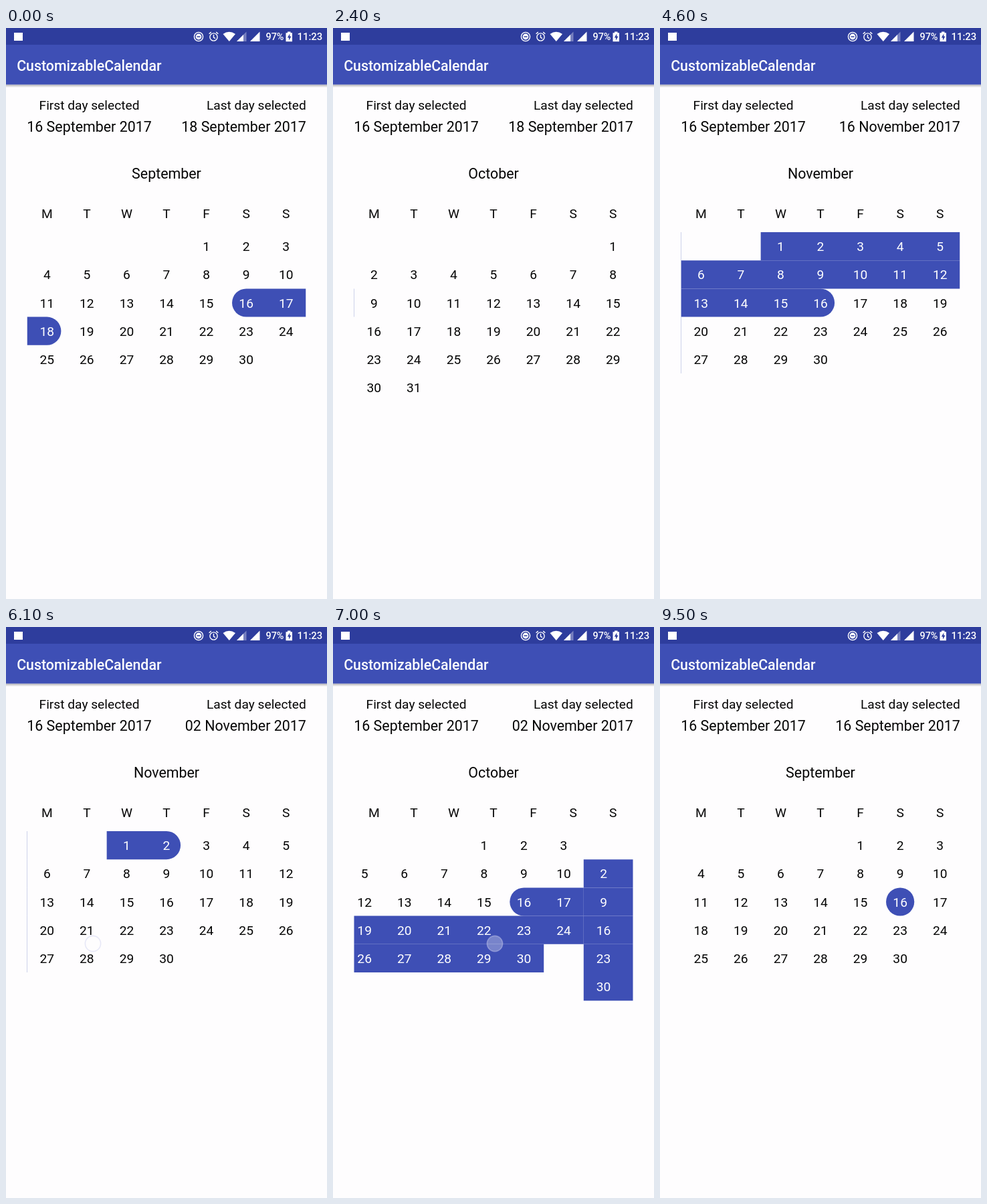
An HTML page that plays this animation: 480x853 px, repeating every 9600 ms.

```html
<!DOCTYPE html>
<html lang="en">
<head>
<meta charset="utf-8">
<title>Calendar range selection</title>
<style>
  html, body { margin: 0; width: 100%; height: 100%; overflow: hidden; background: #fefdfe; }
  svg { display: block; width: 480px; height: 853px; }
  text { font-family: Roboto, "Liberation Sans", sans-serif; font-size: 19.2px; fill: #050505; }
  .big { font-size: 21.4px; }
  .mid { text-anchor: middle; }
  .end { text-anchor: end; }
  .bar { font-size: 21.33px; font-weight: 500; fill: #fff; }
  .status { font-size: 14.9px; font-weight: 500; fill: #fff; }
  .on { fill: #fff; }
  .mark { fill: #3e4fb5; }
  #touch { fill: rgba(255, 255, 255, .3); stroke: rgba(205, 207, 240, .45); stroke-width: 1.6; }
</style>
</head>
<body>
<svg viewBox="0 0 480 853">
  <defs>
    <clipPath id="pager"><rect x="31.5" y="300" width="417" height="270"/></clipPath>
    <linearGradient id="shade" x2="0" y2="1">
      <stop offset="0" stop-color="#000" stop-opacity=".3"/>
      <stop offset="1" stop-color="#000" stop-opacity="0"/>
    </linearGradient>
  </defs>
  <rect width="480" height="853" fill="#fefdfe"/>
  <rect y="84.5" width="480" height="4.5" fill="url(#shade)"/>
  <rect width="480" height="84.5" fill="#3e4fb5"/>
  <rect width="480" height="25" fill="#2e3d9d"/>

  <g fill="#fff">
    <rect x="12" y="7" width="13" height="12"/>
    <circle cx="288" cy="13" r="6.6" fill="none" stroke="#fff" stroke-width="1.4"/>
    <circle cx="288" cy="13" r="4.4"/>
    <path d="M285.5 13h5" stroke="#2e3d9d" stroke-width="1.5"/>
    <g fill="none" stroke="#fff" stroke-width="1.4">
      <circle cx="310.5" cy="13.5" r="5.6"/>
      <path d="M310.5 10v4l2.6 1.6M303.6 8.8l3.2-2.7M317.4 8.8l-3.2-2.7"/>
    </g>
    <path d="M324.5 9Q333.5 2.5 343 9L333.8 20Z"/>
    <path d="M345 20L359.5 5.5V20Z" opacity=".35"/>
    <path d="M345 20L355 10V20Z"/>
    <path d="M365 20L379.5 5.5V20Z"/>
    <path d="M421 5.5h4.5v1.7h2.5v13h-9.5v-13h2.5Z"/>
    <path d="M424.3 8.5l-3.5 6h2.2v4l3.5-6h-2.2Z" fill="#2e3d9d"/>
  </g>
  <text class="status" x="388.5" y="18.4" style="font-size:14.4px">97%</text>
  <text class="status" x="435.5" y="18.4">11:23</text>
  <text class="bar" x="16.2" y="63.5">CustomizableCalendar</text>

  <text class="mid" x="124.5" y="122">First day selected</text>
  <text class="mid big" id="first" x="124.5" y="154.5"></text>
  <text class="end" x="448.8" y="122">Last day selected</text>
  <text class="end big" id="last" x="448.8" y="154.5"></text>
  <text class="mid big" id="month" x="240" y="225.4"></text>
  <g id="week"></g>
  <g clip-path="url(#pager)"><g id="pages"></g></g>
  <circle id="touch" r="11.6"/>
</svg>

<script>
const LOOP = 9600, STEP = 100;  // the screen refreshes ten times a second
const LEFT = 31.5, WIDTH = 417, CELL = WIDTH / 7;
const TOP = 305, ROW = 42.2, R = ROW / 2;

// Days are counted from 1 September; col is the weekday of the 1st.
const months = [
  { name: 'September', start: 0, days: 30, col: 4 },
  { name: 'October', start: 30, days: 31, col: 6 },
  { name: 'November', start: 61, days: 30, col: 2 }
];
const FIRST = 16;
const taps = [
  { from: 2600, to: 2900, day: 42, x: 240, y: 411 },
  { from: 4400, to: 4600, day: 77, x: 240, y: 411 },
  { from: 5300, to: 5600, day: 63, x: 240, y: 327 },
  { from: 7800, to: 8100, day: 17, x: 422, y: 410 },
  { from: 8500, to: 8700, day: 16, x: 360, y: 411 }
];
const swipes = [
  { from: 1600, dir: 1 },
  { from: 3500, dir: 1 },
  { from: 6100, dir: -1 },
  { from: 6800, dir: -1 }
];
const SWIPE = 400, HOLD = 300;

const $ = id => document.getElementById(id);
const center = col => LEFT + CELL * (col + .5);
const label = (x, y, text, on) =>
  `<text class="mid${on ? ' on' : ''}" x="${x}" y="${y}">${text}</text>`;

function dateText(day) {
  const m = months.findLast(m => day > m.start);
  return `${String(day - m.start).padStart(2, '0')} ${m.name} 2017`;
}

// One strip of a row, rounded where the range begins or ends.
function strip(row, a, b, roundA, roundB) {
  const x0 = roundA ? center(a) : LEFT + CELL * a;
  const x1 = roundB ? center(b) : LEFT + CELL * (b + 1);
  const y = TOP + ROW * row;
  const arc = h => `a${R} ${R} 0 0 1 0 ${h}`;
  return `<path class="mark" d="M${x0} ${y}H${x1}${roundB ? arc(ROW) : 'v' + ROW}` +
    `H${x0}${roundA ? arc(-ROW) : ''}Z"/>`;
}

function page(m, index, last) {
  let marks = '', days = '';
  const rows = Math.ceil((m.col + m.days) / 7);
  for (let row = 0; row < rows; row++) {
    const from = Math.max(1, row * 7 - m.col + 1);
    const to = Math.min(m.days, row * 7 - m.col + 7);
    const colOf = d => d + m.col - 1 - row * 7;
    const a = Math.max(from, FIRST - m.start), b = Math.min(to, last - m.start);
    if (a <= b) {
      marks += strip(row, colOf(a), colOf(b), a + m.start === FIRST, b + m.start === last);
    }
    for (let d = from; d <= to; d++) {
      days += label(center(colOf(d)), TOP + ROW * row + 28.2, d, d >= a && d <= b);
    }
  }
  return `<g transform="translate(${index * WIDTH})">${marks}${days}</g>`;
}

function showRange(last) {
  $('last').textContent = dateText(last);
  $('pages').innerHTML = months.map((m, i) => page(m, i, last)).join('');
}

function touchAt(t) {
  const tap = taps.find(s => t >= s.from && t < s.to);
  if (tap) return { x: tap.x, y: tap.y, alpha: t < tap.to - STEP ? 1 : .5 };
  const swipe = swipes.find(s => t >= s.from && t < s.from + HOLD);
  if (!swipe) return { x: 0, y: 0, alpha: 0 };
  const u = (t - swipe.from) / 200;
  return { x: 240 + swipe.dir * (110 - 112 * u), y: 473, alpha: 1 };
}

let shown;
function render(t) {
  let last = 18, pos = 0, settled = 0;
  for (const s of taps) if (t >= s.to - STEP) last = s.day;
  for (const s of swipes) {
    const u = Math.min(1, Math.max(0, (t - s.from) / SWIPE));
    pos += s.dir * (1 - (1 - u) ** 2.5);
    if (u === 1) settled += s.dir;
  }
  if (last !== shown) showRange(shown = last);
  $('pages').setAttribute('transform', `translate(${-pos * WIDTH})`);
  $('month').textContent = months[settled].name;
  const p = touchAt(t);
  $('touch').setAttribute('transform', `translate(${p.x} ${p.y})`);
  $('touch').setAttribute('opacity', p.alpha);
}

$('week').innerHTML = [...'MTWTFSS'].map((c, i) => label(center(i), 283.8, c)).join('');
$('first').textContent = dateText(FIRST);

const begin = performance.now();
function tick() {
  const t = (performance.now() - begin) % LOOP;
  render(Math.floor(t / STEP) * STEP);
  requestAnimationFrame(tick);
}
tick();
</script>
</body>
</html>
```
